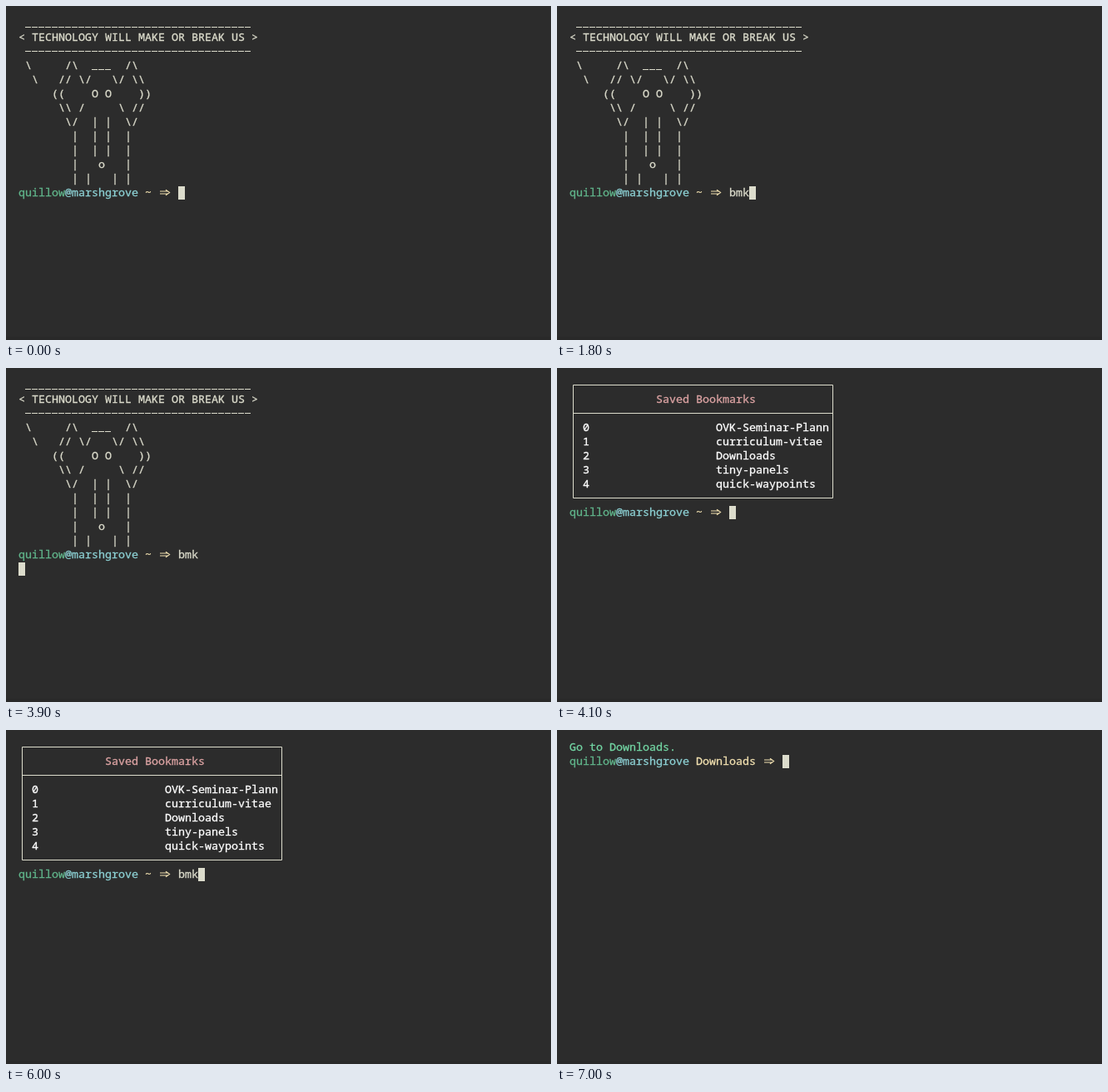
These frames come from a looping animation (655x402 px, 8.9 s). An HTML page:

```html
<!DOCTYPE html>
<html lang="en">
<head>
<meta charset="utf-8">
<title>Terminal bookmarks</title>
<style>
  html, body { margin: 0; width: 100%; height: 100%; overflow: hidden; background: #2c2c2c; }
  svg { display: block; width: 655px; height: 402px; }
  text {
    font: 13.3333px "Noto Sans Mono", "DejaVu Sans Mono", monospace;
    white-space: pre; font-variant-ligatures: none; stroke-width: 0.3px;
  }
</style>
</head>
<body>
<svg id="stage" viewBox="0 0 655 402" xmlns="http://www.w3.org/2000/svg"></svg>
<script>
const LOOP = 8900;
const CELL = 8, LINE = 17, LEFT = 15, TOP = 13;
const C = {
  bg: '#2c2c2c', edge: '#292929', fg: '#dcdccc', white: '#ffffff', red: '#dca3a3',
  green: '#60b48a', mint: '#72d5a3', cyan: '#8cd0d3', yellow: '#f0dfaf'
};
const stage = document.getElementById('stage');
const colX = col => LEFT + col * CELL;
const rowY = row => TOP + row * LINE;

function add(parent, tag, attrs = {}) {
  const el = document.createElementNS('http://www.w3.org/2000/svg', tag);
  for (const key in attrs) el.setAttribute(key, attrs[key]);
  return parent.appendChild(el);
}
const group = () => add(stage, 'g');

// The thin outline gives the letters a medium weight.
function print(parent, row, col, str, color = C.fg) {
  const el = add(parent, 'text', { x: colX(col), y: rowY(row) + 12, fill: color, stroke: color });
  el.textContent = str;
  return el;
}

// Prints each word at its own cell so that columns stay aligned.
function printWords(parent, row, line) {
  for (const m of line.matchAll(/\S+/g)) print(parent, row, m.index, m[0]);
}

function stroke(parent, d, color, extra = {}) {
  return add(parent, 'path', { d, fill: 'none', stroke: color, 'stroke-width': 1, ...extra });
}

function dashes(parent, row, col, count, dy) {
  stroke(parent, `M${colX(col)} ${rowY(row) + dy + 0.5}h${count * CELL}`, C.fg,
    { 'stroke-dasharray': '7 1' });
}

function prompt(parent, row, dir) {
  print(parent, row, 0, 'quillow', C.green);
  print(parent, row, 7, '@marshgrove', C.cyan);
  print(parent, row, 19, dir, C.yellow);
  const x = colX(20 + dir.length), y = rowY(row);
  stroke(parent, `M${x + 2} ${y + 6}h10m-10 3h10M${x + 9} ${y + 4.3}l4.5 3.2l-4.5 3.2`,
    C.yellow, { 'stroke-width': 1.2 });
}

add(stage, 'rect', { width: 655, height: 402, fill: C.bg });
add(stage, 'rect', { y: 398, width: 655, height: 4, fill: C.edge });

// Greeting
const hello = group();
dashes(hello, 0, 1, 34, 12);
printWords(hello, 1, '< TECHNOLOGY WILL MAKE OR BREAK US >');
dashes(hello, 2, 1, 34, 7);
dashes(hello, 3, 11, 3, 12);
[
  ' \\     /\\       /\\',
  '  \\   // \\/   \\/ \\\\',
  '     ((    O O    ))',
  '      \\\\ /     \\ //',
  '       \\/  | |  \\/',
  '        |  | |  |',
  '        |  | |  |',
  '        |   o   |',
  '        | |   | |'
].forEach((line, i) => printWords(hello, 3 + i, line));
prompt(hello, 12, '~');

// Bookmark table
const table = group();
stroke(table, 'M19.5 20.5H331.5V156.5H19.5ZM19.5 54.5H331.5', C.fg);
print(table, 1, 13, 'Saved Bookmarks', C.red);
['OVK-Seminar-Plann', 'curriculum-vitae', 'Downloads', 'tiny-panels', 'quick-waypoints']
  .forEach((name, i) => {
    print(table, 3 + i, 2, i, C.white);
    print(table, 3 + i, 22, name, C.white);
  });
prompt(table, 9, '~');

// Jump result
const jump = group();
print(jump, 0, 0, 'Go to Downloads.', C.mint);
prompt(jump, 1, 'Downloads');

const screens = [hello, table, jump];
const input = print(stage, 12, 24, '');
const cursor = add(stage, 'rect', { width: 8, height: 16, fill: C.fg });

// time, screen, typed text, cursor row, cursor column
const steps = [
  [0, hello, '', 12, 24],
  [1100, hello, 'b', 12, 25],
  [1200, hello, 'bm', 12, 26],
  [1800, hello, 'bmk', 12, 27],
  [2600, hello, 'bmk ', 12, 28],
  [3900, hello, 'bmk', 13, 0],
  [4100, table, '', 9, 24],
  [5400, table, 'b', 9, 25],
  [5700, table, 'bm', 9, 26],
  [6000, table, 'bmk', 9, 27],
  [6200, table, 'bmk ', 9, 28],
  [6700, table, 'bmk 2', 9, 29],
  [7000, jump, '', 1, 32]
];

let shown;
function draw(t) {
  const step = steps.findLast(s => s[0] <= t);
  if (step === shown) return;
  shown = step;
  const [, screen, typed, row, col] = step;
  for (const s of screens) s.setAttribute('display', s === screen ? 'inline' : 'none');
  input.textContent = typed;
  input.setAttribute('y', rowY(screen === hello ? 12 : 9) + 12);
  cursor.setAttribute('x', colX(col));
  cursor.setAttribute('y', rowY(row));
}

const start = performance.now();
function tick() {
  draw((performance.now() - start) % LOOP);
  requestAnimationFrame(tick);
}
tick();
</script>
</body>
</html>
```
